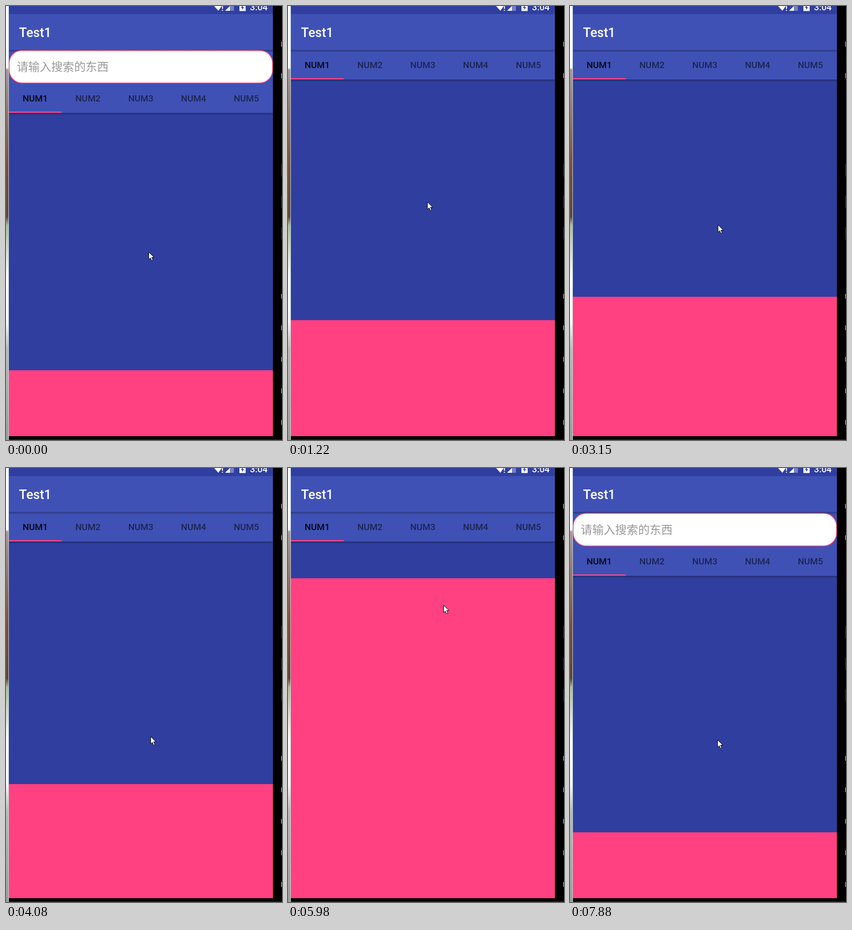
Write an HTML page that moves like this. It is 577 px wide and 909 px high and loops after 8 s.

```html
<!DOCTYPE html>
<html lang="zh">
<head>
<meta charset="utf-8">
<style>
html, body { margin: 0; width: 100%; height: 100%; overflow: hidden; background: #000; }
svg { display: block; width: 577px; height: 909px; }
text { font-family: Roboto, "Noto Sans", sans-serif; font-weight: 500; }
.hint { font: 400 24px "Noto Sans CJK SC", "Noto Sans CJK", sans-serif; fill: #999; }
</style>
</head>
<body>
<svg viewBox="0 0 577 909">
  <defs>
    <linearGradient id="shade" x2="0" y2="1">
      <stop stop-opacity=".32"/><stop offset="1" stop-opacity="0"/>
    </linearGradient>
    <linearGradient id="photo" x2="0" y2="1">
      <stop offset=".142" stop-color="#fff"/><stop offset=".147" stop-color="#a59a98"/>
      <stop offset=".36" stop-color="#7c5138"/><stop offset=".485" stop-color="#5e4633"/>
      <stop offset=".505" stop-color="#a9bd93"/><stop offset=".63" stop-color="#fff"/>
      <stop offset=".73" stop-color="#f4f6f5"/><stop offset=".79" stop-color="#b4bdb7"/>
      <stop offset="1" stop-color="#969f97"/>
    </linearGradient>
    <clipPath id="body"><rect x="6" y="92" width="552" height="809"/></clipPath>
  </defs>
  <rect width="577" height="909"/>
  <rect width="5" height="909" fill="url(#photo)"/>
  <rect x="5" width="1" height="909" fill="#c9d6da"/>
  <path d="M6 908.5H577" stroke="#333"/>
  <g id="edge"></g>

  <rect x="6" width="552" height="901" fill="#303f9f"/>
  <g clip-path="url(#body)">
    <rect id="panel" x="6" width="552" height="902" fill="#ff4081"/>
    <g id="header">
      <rect x="6" width="552" height="154" fill="#3f51b5"/>
      <rect x="6.7" y="22.7" width="550.6" height="68.6" rx="27" fill="#fff" stroke="#ff4081" stroke-width="1.5"/>
      <text class="hint" x="22.5" y="66">请输入搜索的东西</text>
      <g id="tabs" font-size="18.8" text-anchor="middle"></g>
      <rect x="6" y="151" width="110.4" height="2.6" fill="#ff4081"/>
      <rect x="6" y="154" width="552" height="5" fill="url(#shade)"/>
    </g>
  </g>

  <rect x="6" y="17" width="552" height="75" fill="#3f51b5"/>
  <rect x="6" y="92" width="552" height="5" fill="url(#shade)"/>
  <g fill="#fff">
    <text x="27.3" y="64.5" font-size="26.8">Test1</text>
    <text x="510" y="9" font-size="18.8">3:04</text>
    <path d="M435 0H451L444 10ZM451.5 0H453.5V6H451.5ZM451.5 8H453.5V10H451.5ZM458 10L468 0V10ZM488 0H501V10.5H488Z"/>
    <path d="M468 0H476.5V10H468Z" opacity=".35"/>
    <path d="M495.5 -2L491 4H494L493 8.5L498 2.5H495Z" fill="#303f9f"/>
  </g>
  <path id="cursor" d="M.5 .5V16L4 12.6L6.6 18.5L9.2 17.4L6.7 11.6H11.5Z" fill="#fff" stroke="#000"/>
</svg>
<script>
const $ = id => document.getElementById(id);
const clamp = (v, lo, hi) => Math.min(hi, Math.max(lo, v));
const LOOP = 8000, STEP = 135.9, LAST = 58;
const TOP = 231, REST = 763, OPEN = 835; // panel's highest and lowest place, header fully open

// each drag of the pointer; fling is how far the panel glides on after release
const drags = [
  { from: 0, to: 6, x: 298, y: 515, end: 348, fling: 0 },
  { from: 8, to: 12, x: 290, y: 418, end: 290, fling: -99 },
  { from: 17, to: 25, x: 300, y: 288, end: 590, fling: 0 },
  { from: 26, to: 35, x: 313, y: 641, end: 243, fling: -95 },
  { from: 41, to: 44, x: 270, y: 590, end: 287, fling: 0 },
  { from: 44, to: 49, x: 325, y: 287, end: 584, fling: 63 },
  { from: 52, to: 57, x: 333, y: 292, end: 583, fling: 0 },
  { from: LAST, x: 308, y: 569 }
];

$("tabs").innerHTML = [1, 2, 3, 4, 5].map(n =>
  `<text x="${110.4 * n - 49.4}" y="130" fill-opacity="${n > 1 ? .54 : .92}">NUM${n}</text>`).join("");

// slivers of a neighbouring toolbar: bright, dim or none
$("edge").innerHTML = [..."bb  ddd bbbbb"].map((kind, i) => {
  const h = kind === "d" ? 26 : 10;
  return kind === " " ? "" :
    `<rect x="576" y="${80 + 66 * i - h / 2}" width="1" height="${h}" fill="${kind === "d" ? "#444" : "#fff"}"/>`;
}).join("");

function pose(k) {
  let scroll = 833;
  for (let i = 0; ; i++) {
    const d = drags[i], next = drags[i + 1];
    const pull = clamp((k - d.from) / (d.to - d.from), 0, 1) ** 2;
    const rest = clamp((k - d.to) / (next.from - d.to || 1), 0, 1);
    const back = rest * rest * (3 - 2 * rest), glide = 1 - (1 - rest) ** 2;
    scroll = clamp(scroll + (d.end - d.y) * pull, TOP, OPEN) + d.fling * glide;
    if (k < next.from || next.from === LAST) return {
      x: d.x + (next.x - d.x) * (k - d.from) / (next.from - d.from),
      y: d.y + (d.end - d.y) * pull + (next.y - d.end) * back,
      scroll
    };
  }
}

function draw() {
  const k = Math.min(LAST, Math.floor((performance.now() % LOOP + 30) / STEP));
  const { x, y, scroll } = pose(k);
  const place = (id, x, y) => $(id).setAttribute("transform", `translate(${Math.round(x)} ${Math.round(y)})`);
  place("cursor", x, y);
  place("panel", 0, Math.min(scroll, REST));
  place("header", 0, Math.max(scroll - REST, 0));
  requestAnimationFrame(draw);
}
draw();
</script>
</body>
</html>
```
